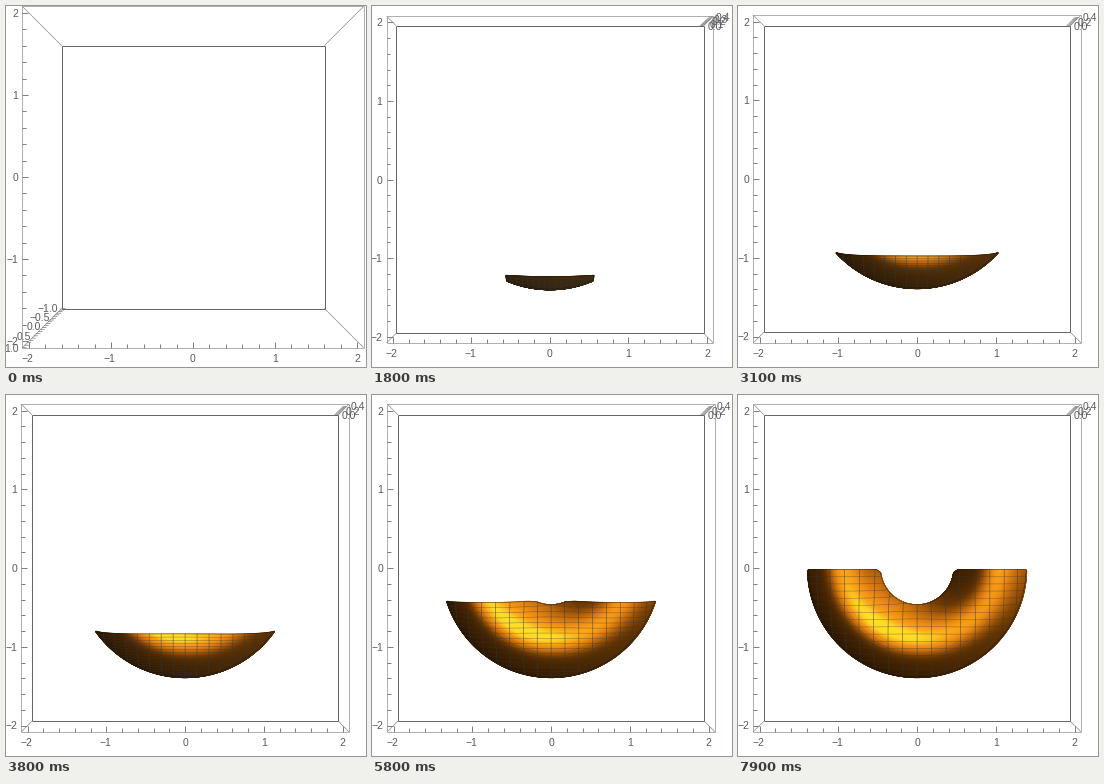
Write a matplotlib script that moves like this. It is 360 px wide and 361 px high and loops after 8 s.

```python
import numpy as np
import matplotlib.pyplot as plt
from matplotlib.animation import FuncAnimation
from matplotlib.collections import LineCollection
from matplotlib.colors import LinearSegmentedColormap

W, H, FRAMES = 360, 361, 80
EXTENT = 2.08              # half width of the plot box in data units
RING, TUBE = 0.99, 0.49    # radii of the torus
OUTER, INNER = RING + TUBE, RING - TUBE
CELL = 2 / 7               # sampling cell of the surface

plt.rcParams["font.family"] = "Liberation Sans"
fig = plt.figure(figsize=(W / 100, H / 100), dpi=100, facecolor="white")
ax = fig.add_axes([0, 0, 1, 1])

glow = LinearSegmentedColormap.from_list("glow", [
    (0, "#2c1700"), (0.25, "#663500"), (0.5, "#b5620c"),
    (0.75, "#f08c14"), (0.9, "#fba81a"), (1, "#ffdc28")])


class View:
    """Perspective seen from straight above the box."""

    def __init__(self, cx, cy, near, back, z0, z1):
        self.cx, self.cy, self.z0, self.z1 = cx, cy, z0, z1
        self.near, self.back = near, back

    def half(self, z):
        k = (z - self.z0) / (self.z1 - self.z0)
        return 1 / ((1 - k) / self.back + k / self.near)

    def project(self, x, y, z):
        s = self.half(z) / EXTENT
        return self.cx + x * s, self.cy - y * s


def number(v, digits=0):
    return f"{v:.{digits}f}".replace("-", "\u2212")


def label(x, y, text, ha):
    ax.text(x, y, text, ha=ha, va="center_baseline", fontsize=7.5, color="#5a5a5a")


def segments(lines, color, width=0.72, snap=True):
    ax.add_collection(LineCollection(lines, colors=color, linewidths=width, snap=snap))


def square(view, z):
    e = EXTENT
    return [view.project(x, y, z) for x, y in
            [(-e, -e), (e, -e), (e, e), (-e, e), (-e, -e)]]


def draw_box(view, z_values, z_step, digits, side):
    front, rear = square(view, view.z1), square(view, view.z0)
    segments(list(zip(front, front[1:])), "#b0b0b0")
    segments(list(zip(front[:4], rear[:4])), "#8c8c8c", 0.5, False)
    segments(list(zip(rear, rear[1:])), "#666666")

    ticks = []
    left, bottom = front[0]
    for i in range(-10, 11):
        v = i / 5
        px, py = view.project(v, v, view.z1)
        size = 6 if i % 5 == 0 else 3.5
        ticks += [[(left, py), (left + size, py)], [(px, bottom), (px, bottom - size)]]
        if i % 5 == 0:
            label(left - 4, py, number(v), "right")
            label(px - (1 if v < 0 else 0), bottom + 10, number(v), "center")
    segments(ticks, "#808080")

    # depth axis along the lower left (side -1) or upper right (side 1) edge
    ticks = []
    for v in np.arange(z_values[0], z_values[-1] + 0.001, z_step):
        px, py = view.project(side * EXTENT, side * EXTENT, v)
        ticks.append([(px, py), (px - side * 4, py)])
    for v in z_values:
        px, py = view.project(side * EXTENT, side * EXTENT, v)
        label(px + side * 3.5, py, number(v, digits), "left" if side > 0 else "right")
    segments(ticks, "#666666", 0.45, False)


def height(x, y):
    return np.sqrt(np.clip(TUBE**2 - (np.hypot(x, y) - RING)**2, 0, None))


def chord(radius, v):
    return np.sqrt(max(radius**2 - v**2, 0))


def cell_limit(cut):
    """Half width reached by the sampled cells for this cut."""
    row = -2 + CELL * np.floor((cut + 2) / CELL)
    return CELL * np.ceil(chord(OUTER, row) / CELL)


def brightness(nx, ny):
    side = np.clip(nx + ny, -1.2, 1.2)
    width = 0.42 + 0.2 * side
    offset = (nx - 0.08)**2 + (ny - 0.2)**2
    return 0.2 + 0.16 * side + 0.8 * np.exp(-offset / width**2)


def draw_surface(view, cut, bevel):
    limit = cell_limit(cut)
    phi_end = np.arccos(np.clip((-cut - RING) / TUBE, -1, 1))
    phi = (phi_end * np.sin(np.linspace(0, np.pi / 2, 48)))[:, None]
    rho, z = RING + TUBE * np.cos(phi), TUBE * np.sin(phi)
    edge = cut - bevel * np.clip(1 - z / 0.2, 0, None)
    swing = np.minimum(np.arccos(np.clip(-edge / rho, 0, 1)),
                       np.arcsin(np.clip(limit / rho, 0, 1)))
    angle = swing * np.linspace(-1, 1, 90)
    dx, dy = np.sin(angle), -np.cos(angle)
    px, py = view.project(rho * dx, rho * dy, z)
    shade = brightness(np.cos(phi) * dx, np.cos(phi) * dy)
    ax.pcolormesh(px, py, shade, cmap=glow, vmin=0, vmax=1, shading="gouraud")

    # 15 mesh lines in each direction
    wide = min(limit, chord(OUTER, cut))
    columns, rows = [], []
    for k in range(1, 16):
        x = wide * (k / 8 - 1)
        top, low = min(cut, -chord(INNER, x)), -chord(OUTER, x)
        if low < top:
            y = np.linspace(low, top, 40)
            columns.append(np.column_stack(view.project(x, y, height(x, y))))
        y = -OUTER + (cut + OUTER) * k / 16
        end, hole = min(limit, chord(OUTER, y)), chord(INNER, y)
        for a, b in [(-end, -hole), (hole, end)]:
            x = np.linspace(a, b, 40)
            rows.append(np.column_stack(view.project(x, y, height(x, y))))
    segments(columns, (0.18, 0.22, 0.24, 0.7), 0.45, False)
    segments(rows, (0.18, 0.22, 0.24, 0.5), 0.4, False)

    rim = [np.concatenate([p[0], p[:, -1], p[-1, ::-1], p[::-1, 0]]) for p in (px, py)]
    ax.plot(*rim, color="#20140a", lw=0.4, alpha=0.8)


def draw(n):
    ax.cla()
    ax.axis("off")
    cut = -1.6 + 0.02 * n
    if n < 9:
        view = View(187, 171, 170.7, 131.5, -1, 1)
        draw_box(view, [-1, -0.5, 0, 0.5, 1], 0.1, 1, -1)
    else:
        top = 0.5 if cut >= -1 else np.sqrt(0.25 - (cut + 1)**2)
        q = min((0.5 - top) / 0.067, 1)
        near = 163.8 - 0.5 * q
        view = View(179.1 - 1.3 * q, 173 + 0.6 * q, near, near / (1 + 0.14 * top), 0, top)
        step = 0.2 if top > 0.47 else 0.1
        draw_box(view, np.arange(0, top, step), 0.05, 1, 1)
        draw_surface(view, cut, 0.02 + 0.03 * max(0, (n - 70) / 9))
    ax.set_xlim(0, W)
    ax.set_ylim(H, 0)
    return []


anim = FuncAnimation(fig, draw, frames=FRAMES, interval=100, repeat=True,
                     repeat_delay=0, init_func=lambda: [])
plt.show()
```
